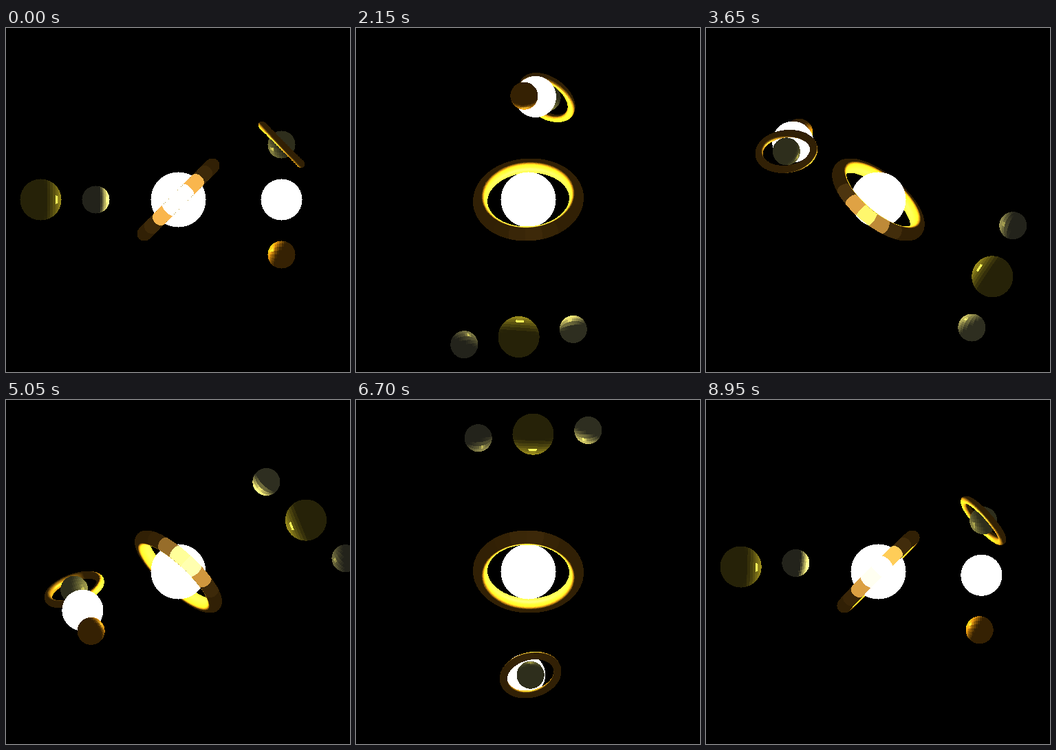
Write an HTML page with a canvas that moves like this. It is 500 px wide and 500 px high and loops after 9000 ms.

```html
<!DOCTYPE html>
<html>
<head>
<meta charset="utf-8">
<style>
html, body { margin: 0; width: 100%; height: 100%; overflow: hidden; background: #000; }
canvas { display: block; width: 100vmin; height: 100vmin; image-rendering: pixelated; }
</style>
</head>
<body>
<canvas id="stage" width="500" height="500"></canvas>
<script>
const SIZE = 500, STEPS = 180, STEP_MS = 50, LIGHT_Z = -20;
const ctx = document.getElementById('stage').getContext('2d');
const image = ctx.createImageData(SIZE, SIZE);
const pixels = new Uint32Array(image.data.buffer);
const depth = new Float32Array(SIZE * SIZE);
const { sin, cos, PI, sqrt, floor, min, max } = Math;

const MATERIAL = {
  star: { glow: true },
  giant: { ambient: [38, 34, 8], diffuse: [250, 228, 45], shine: 420, power: 65 },
  moon: { ambient: [35, 35, 27], diffuse: [300, 285, 140], shine: 110, power: 40 },
  paleMoon: { ambient: [46, 46, 32], diffuse: [520, 490, 230], shine: 110, power: 40 },
  ringed: { ambient: [46, 46, 28], diffuse: [150, 143, 65], shine: 160, power: 40 },
  amber: { ambient: [53, 33, 3], diffuse: [480, 315, 35], shine: 110, power: 20 },
  ring: { ambient: [49, 32, 5], diffuse: [620, 440, 70], shine: 130, power: 8 }
};

// 3x3 row-major rotations
const rad = deg => deg * PI / 180;
const rotX = deg => { const c = cos(rad(deg)), s = sin(rad(deg)); return [1, 0, 0, 0, c, -s, 0, s, c]; };
const rotY = deg => { const c = cos(rad(deg)), s = sin(rad(deg)); return [c, 0, s, 0, 1, 0, -s, 0, c]; };
const rotZ = deg => { const c = cos(rad(deg)), s = sin(rad(deg)); return [c, -s, 0, s, c, 0, 0, 0, 1]; };
const apply = (m, x, y, z) => [
  m[0] * x + m[1] * y + m[2] * z,
  m[3] * x + m[4] * y + m[5] * z,
  m[6] * x + m[7] * y + m[8] * z
];
const transpose = m => [m[0], m[3], m[6], m[1], m[4], m[7], m[2], m[5], m[8]];
const mul = (a, b) => {
  const cols = [0, 1, 2].map(i => apply(a, b[i], b[i + 3], b[i + 6]));
  return transpose(cols.flat());
};
const add = (a, b) => a.map((v, i) => v + b[i]);

const pack = (r, g, b) =>
  (255 << 24 | min(255, b) << 16 | min(255, g) << 8 | min(255, r)) >>> 0;

// Colour at a point with a normal, lit from the central star;
// glare brightens surfaces that stand between the star and the viewer
function shade(material, point, normal, glare = 0) {
  const lx = -point[0], ly = -point[1], lz = LIGHT_Z - point[2];
  const dist = sqrt(lx * lx + ly * ly + lz * lz);
  const facing = (normal[0] * lx + normal[1] * ly + normal[2] * lz) / dist;
  const lit = max(0, facing);
  const fade = min(1.2, (125 / dist) ** 2);
  const mirror = 2 * facing * normal[2] - lz / dist;
  const spec = lit > 0 && mirror > 0 ? material.shine * mirror ** material.power : 0;
  const haze = facing < 0 ? glare : 0;
  const [r, g, b] = material.ambient.map((a, i) => a + material.diffuse[i] * lit * fade);
  return pack(r + spec + 800 * haze, g + spec * 0.95 + 600 * haze, b + spec * 0.35 + 290 * haze);
}

function plot(px, py, z, color) {
  if (px < 0 || py < 0 || px >= SIZE || py >= SIZE) return;
  const i = py * SIZE + px;
  if (z <= depth[i]) return;
  depth[i] = z;
  pixels[i] = color();
}

const FACET = PI / 20, SLICE = PI / 10;
const snap = (v, step) => (floor(v / step) + 0.5) * step;

// Flat facets: 20 bands from pole to pole along local x, 20 around
function sphere([cx, cy, cz], radius, material, turn) {
  const back = transpose(turn);
  const x0 = Math.ceil(250 + cx - radius), y0 = Math.ceil(249 - cy - radius);
  for (let py = y0; py <= y0 + 2 * radius; py++) {
    for (let px = x0; px <= x0 + 2 * radius; px++) {
      const x = px - 250 - cx, y = 249 - py - cy, zz = radius * radius - x * x - y * y;
      if (zz < 0) continue;
      const z = sqrt(zz);
      plot(px, py, cz + z, () => {
        if (material.glow) return 0xffffffff;
        const n = apply(back, x / radius, y / radius, z / radius);
        const lat = snap(Math.acos(max(-1, min(1, n[0]))), FACET);
        const lon = snap(Math.atan2(n[2], n[1]), SLICE);
        const normal = apply(turn, cos(lat), sin(lat) * cos(lon), sin(lat) * sin(lon));
        return shade(material, add([cx, cy, cz], normal.map(v => v * radius)), normal);
      });
    }
  }
}

function torus(center, tube, radius, turn) {
  const around = Math.ceil((radius + tube) * 13), across = Math.ceil(tube * 13);
  for (let i = 0; i < around; i++) {
    const u = i / around * 2 * PI, mid = snap(u, SLICE);
    const spoke = apply(turn, cos(u), 0, -sin(u));
    const core = add(center, spoke.map(v => v * radius));
    // one glare level per slice, strongest where the slice hides the star
    const block = add(center, apply(turn, cos(mid) * radius, 0, -sin(mid) * radius));
    const glare = max(0, block[2] / Math.hypot(...block)) ** 12;
    for (let j = 0; j < across; j++) {
      const v = j / across * 2 * PI, cv = cos(v), sv = sin(v);
      const nz = spoke[2] * cv + turn[7] * sv;
      if (nz < -0.05) continue;
      const nx = spoke[0] * cv + turn[1] * sv, ny = spoke[1] * cv + turn[4] * sv;
      const px = Math.round(250 + core[0] + nx * tube);
      const py = Math.round(249 - core[1] - ny * tube);
      plot(px, py, core[2] + nz * tube, () => shade(MATERIAL.ring, core, [nx, ny, nz], glare));
    }
  }
}

function render(step) {
  pixels.fill(0xff000000);
  depth.fill(-1e4);
  const angle = step * 2, orbit = rotZ(angle);

  sphere([0, 0, 0], 40, MATERIAL.star, orbit);
  torus([0, 0, 0], 10, 70, mul(rotY(angle), rotZ(45)));

  // giant with two moons
  const giant = apply(orbit, -200, 0, 0), moonTurn = rotZ(-2 * angle);
  const moonAt = x => add(giant, apply(moonTurn, x, 0, 0));
  sphere(giant, 30, MATERIAL.giant, orbit);
  sphere(moonAt(80), 20, MATERIAL.moon, moonTurn);
  sphere(moonAt(-80), 20, MATERIAL.paleMoon, moonTurn);

  // white companion with a ringed planet and an amber one
  const companion = apply(orbit, 150, 0, 0);
  const pairTurn = mul(orbit, rotX(3 * angle));
  const ringed = add(companion, apply(pairTurn, 0, 80, 0));
  sphere(companion, 30, MATERIAL.star, orbit);
  sphere(ringed, 20, MATERIAL.ringed, pairTurn);
  sphere(add(companion, apply(pairTurn, 0, -80, 0)), 20, MATERIAL.amber, pairTurn);
  torus(ringed, 5, 40, mul(pairTurn, mul(rotZ(-45), rotX(4 * angle))));

  ctx.putImageData(image, 0, 0);
}

let shown = -1;
const start = performance.now();
function tick() {
  const step = floor(max(0, performance.now() - start) / STEP_MS) % STEPS;
  if (step !== shown) render(shown = step);
  requestAnimationFrame(tick);
}
tick();
</script>
</body>
</html>
```
